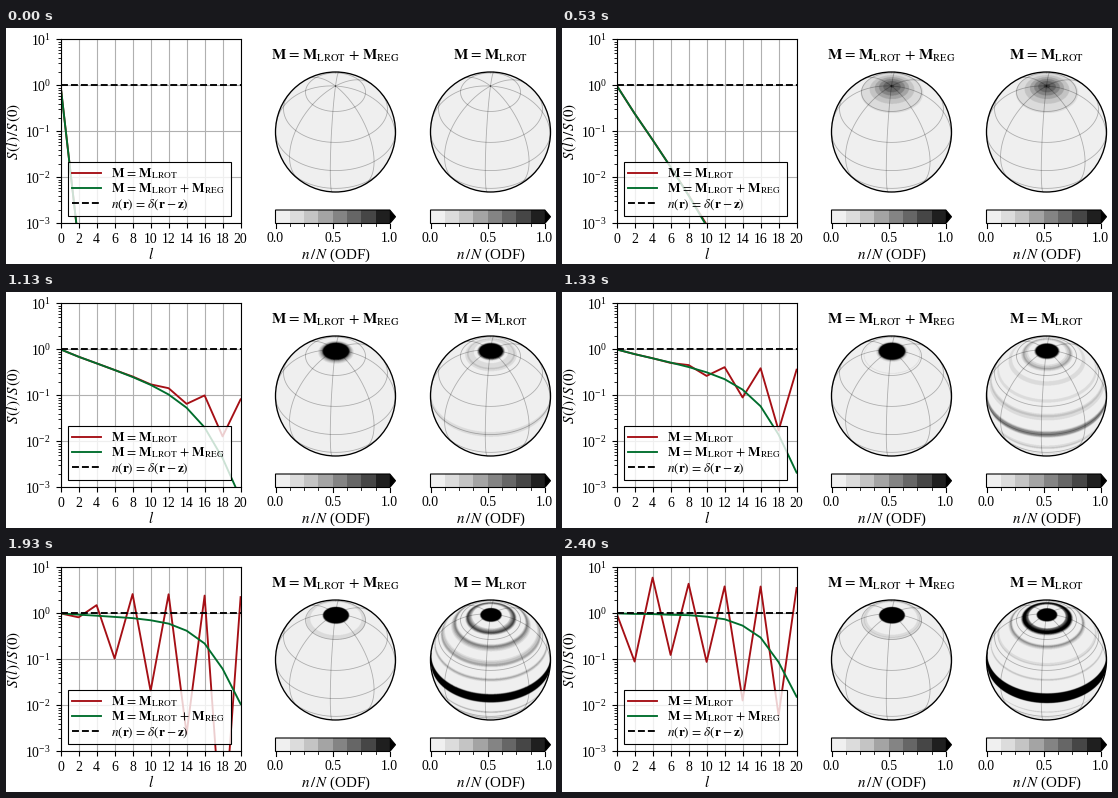
These frames come from a looping animation (550 px wide and 236 px high, 2.47 s). A matplotlib script:

```python
import numpy as np
import matplotlib.pyplot as plt
from matplotlib.animation import FuncAnimation
from matplotlib.patches import Circle, Polygon, Rectangle
from numpy.polynomial.legendre import legval

W, H, DPI = 550, 236, 100
LOOP, STATES, HOLD = 2470, 37, 3   # each state is held for three ticks
TICKS = STATES * HOLD
PT = 72 / DPI                      # points per pixel
RED, GREEN = "#a50f15", "#006d2c"

plt.rcParams.update({
    "font.family": "Liberation Serif",
    "mathtext.fontset": "stix",
    "axes.linewidth": 0.8,
})

# Spectral model: even modes up to degree 20 of an axisymmetric distribution
DEG = np.arange(0, 21, 2)
STEP, SUBSTEPS = 0.048, 3
NU, POWER = 12.0, 3


def rate_matrix(nu):
    m = np.zeros((len(DEG), len(DEG)))
    for i, l in enumerate(DEG[1:], 1):
        c = l * (l + 1) / (2 * l + 1)
        m[i, i - 1] = c * (l - 1) / (2 * l - 1)
        m[i, i] = l * (l + 1) / ((2 * l - 1) * (2 * l + 3))
        m[i, i] -= nu * (l * (l + 1) / 420) ** POWER
        if i + 1 < len(DEG):
            m[i, i + 1] = -c * (l + 2) / (2 * l + 3)
    return m


def evolve(nu):
    """One row of mode amplitudes per state, from explicit Euler steps."""
    m = rate_matrix(nu)
    a = np.zeros(len(DEG))
    a[0] = 1
    rows = []
    for n in range(STATES * SUBSTEPS):
        a = a + STEP * m @ a
        if n % SUBSTEPS == 0:
            rows.append(a)
    return rows


plain, regular = evolve(0), evolve(NU)

fig = plt.figure(figsize=(W / DPI, H / DPI), dpi=DPI, facecolor="white")

# Spectrum plot
ax = fig.add_axes([54.6 / W, 1 - 195.4 / H, 180 / W, 184 / H])
ax.set_yscale("log")
ax.set_xlim(0, 20)
ax.set_ylim(1e-3, 1e1)
ax.set_xticks(DEG)
ax.tick_params(labelsize=13.8 * PT)
ax.grid(color="#b0b0b0", lw=0.8)
ax.set_axisbelow(True)
red_line, = ax.plot([], [], color=RED, lw=1.35)
green_line, = ax.plot([], [], color=GREEN, lw=1.35)
ax.plot([0, 20], [1, 1], "k--", lw=1.35)

# Overlay in pixel coordinates, origin at the top left
page = fig.add_axes([0, 0, 1, 1])
page.axis("off")
page.patch.set_alpha(0)


def label(x, y, text, size, ha="center", **kw):
    page.text(x, y, text, fontsize=size * PT, ha=ha,
              **{"va": "baseline", **kw})


def spaced(op, gap=0.13):
    return rf"\hspace{{{gap}}}{op}\hspace{{{gap}}}"


LROT = r"\mathbf{M}_{\mathrm{LROT}}"
M_LROT = rf"$\mathbf{{M}}{spaced('=')}{LROT}$"
M_BOTH = rf"$\mathbf{{M}}{spaced('=')}{LROT}{spaced('+')}\mathbf{{M}}_{{\mathrm{{REG}}}}$"
DELTA = rf"$n(\mathbf{{r}}){spaced('=')}\delta(\mathbf{{r}}-\mathbf{{z}})$"
POWER_LABEL = rf"$S\hspace{{0.13}}(l){spaced('/', 0.1)}S\hspace{{0.13}}(0)$"

label(145, 231, "$l$", 15)
label(8, 103.5, POWER_LABEL, 15, rotation=90, va="center")

# Legend
page.add_patch(Rectangle((62, 133.5), 163, 54.7, fc=(1, 1, 1, 0.8), ec="k",
                         lw=0.8, zorder=3))
for y, color, style, text in ((144.8, RED, "-", M_LROT),
                              (159.8, GREEN, "-", M_BOTH),
                              (175.4, "k", "--", DELTA)):
    page.plot([66, 95], [y, y], color=color, ls=style, lw=1.35, zorder=4)
    label(104.6, y + 4.2, text, 13.3, ha="left", zorder=4)

# Globes
R, CY, TILT, LON0 = 60, 104, np.radians(40), -5
SHADES = plt.get_cmap("Greys")(np.linspace(0.125, 1, 9))

side = np.linspace(-1, 1, 3 * 2 * R)
gx, gy = np.meshgrid(side, -side)
depth = np.sqrt(np.clip(1 - gx**2 - gy**2, 0, None))
POLAR = np.arccos(np.clip(gy * np.cos(TILT) + depth * np.sin(TILT), -1, 1))
NODES = np.linspace(0, np.pi, 40)  # coarse latitudes, linear in between


def project(lat, lon):
    x = np.cos(lat) * np.sin(lon)
    y = np.cos(TILT) * np.sin(lat) - np.sin(TILT) * np.cos(lat) * np.cos(lon)
    z = np.sin(TILT) * np.sin(lat) + np.cos(TILT) * np.cos(lat) * np.cos(lon)
    return np.where(z >= 0, x, np.nan), y


def shade(a):
    coef = np.zeros(21)
    coef[DEG] = (2 * DEG + 1) * a / (4 * np.pi)
    n = np.interp(POLAR, NODES, legval(np.cos(NODES), coef))
    return SHADES[np.clip(np.floor(n * 8).astype(int), 0, 8)]


def graticule(cx):
    turn = np.radians(np.linspace(-180, 180, 361))
    rise = np.radians(np.linspace(-90, 90, 181))
    curves = [project(np.radians(lat), turn) for lat in (-30, 0, 30, 60)]
    curves += [project(rise, np.radians(LON0 + lon)) for lon in range(-180, 180, 45)]
    for x, y in curves:
        page.plot(cx + R * x, CY - R * y, color="k", alpha=0.27, lw=0.6, zorder=2)


def colorbar(x0):
    top, bottom, seg = 182, 195.5, 114.3 / 8
    for i in range(8):
        page.add_patch(Rectangle((x0 + i * seg, top), seg, bottom - top,
                                 fc=SHADES[i], lw=0))
    x1, tip, mid = x0 + 8 * seg, x0 + 120, (top + bottom) / 2
    page.add_patch(Polygon([(x1, top), (tip, mid), (x1, bottom)],
                           fc=SHADES[8], lw=0))
    page.add_patch(Polygon([(x0, top), (x1, top), (tip, mid), (x1, bottom),
                            (x0, bottom)], fc="none", ec="k", lw=0.8, zorder=3))
    for i in range(9):
        x = x0 + i * seg
        major = i % 4 == 0
        page.plot([x, x], [bottom, bottom + (4.9 if major else 2.8)],
                  color="k", lw=0.8 if major else 0.6)
        if major:
            label(x, 214.5, f"{i / 8:.1f}", 13.8)
    label(x0 + 60, 231, rf"$n{spaced('/', 0.15)}N$ (ODF)", 15)


def globe(cx, title):
    image = page.imshow(shade(plain[0]), extent=(cx - R, cx + R, CY + R, CY - R),
                        aspect="auto", interpolation="antialiased", zorder=1)
    rim = Circle((cx, CY), R, fc="none", ec="k", lw=0.95, zorder=3)
    page.add_patch(rim)
    image.set_clip_path(rim)
    graticule(cx)
    label(cx, 31.5, title, 15)
    colorbar(cx - R)
    return image


left = globe(329.5, M_BOTH)
right = globe(484.5, M_LROT)
page.set_xlim(0, W)
page.set_ylim(H, 0)


def draw(tick):
    k = min((tick + 1) // HOLD, STATES - 1)
    for line, image, a in ((red_line, right, plain[k]),
                           (green_line, left, regular[k])):
        line.set_data(DEG, np.maximum(a**2, 1e-30))
        image.set_data(shade(a))
    return red_line, green_line, left, right


anim = FuncAnimation(fig, draw, frames=TICKS, interval=LOOP / TICKS,
                     repeat=True, repeat_delay=0, blit=False)
plt.show()
```
